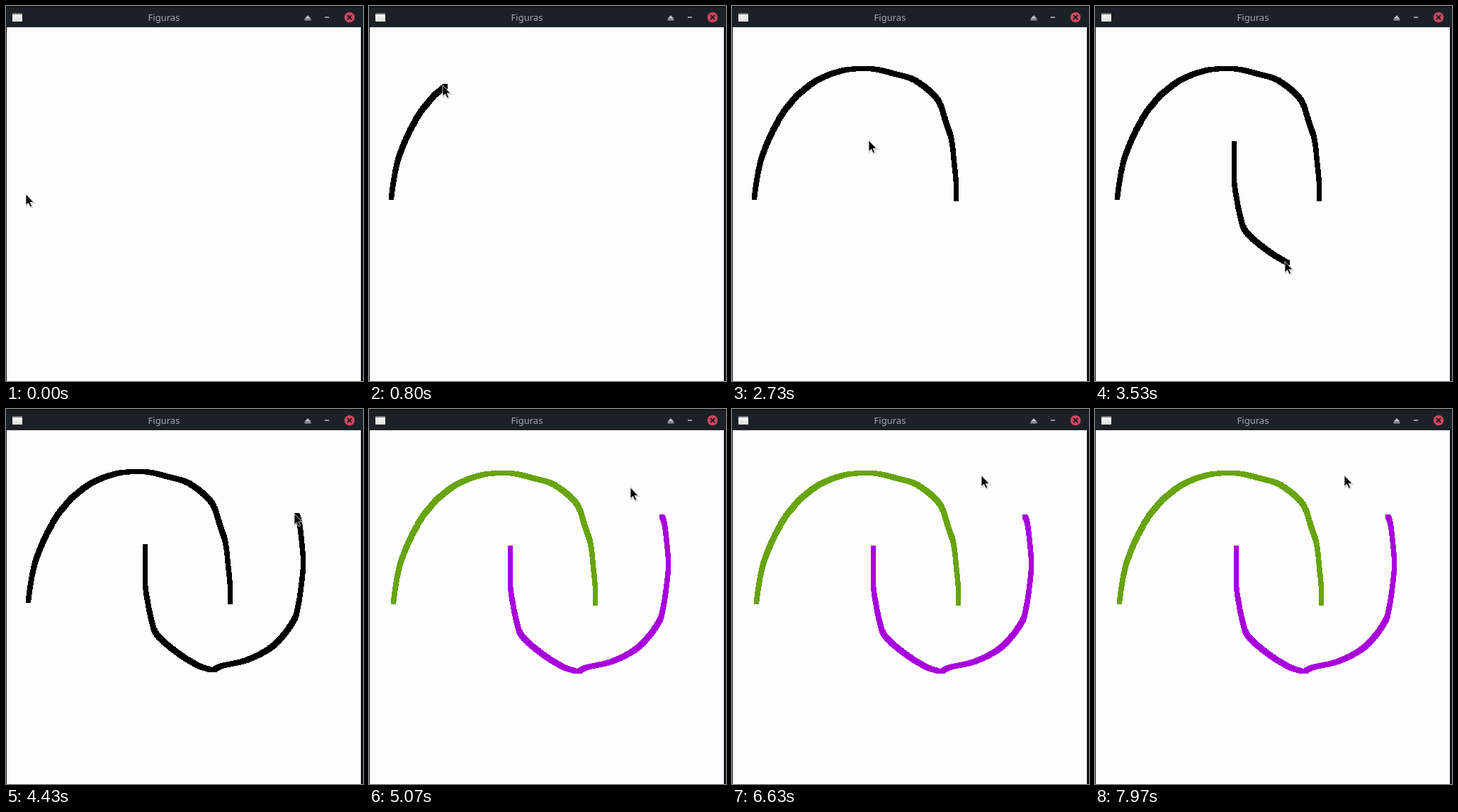
Animation of 504 by 530 pixels, one loop 8 s. Source, as an HTML page with a canvas:

```html
<!DOCTYPE html>
<html lang="es">
<head>
<meta charset="utf-8">
<title>Figuras</title>
<style>
  html, body { margin: 0; width: 100%; height: 100%; overflow: hidden; background: #fdfdfd; }
  canvas, svg { position: absolute; left: 0; top: 0; display: block; }
  text { font: 13px "Noto Sans", "Open Sans", sans-serif; fill: #a4a8ae; text-anchor: middle; }
</style>
</head>
<body>
<canvas id="board" width="504" height="530"></canvas>
<svg width="504" height="530" viewBox="0 0 504 530">
  <defs>
    <linearGradient id="icon" x2="0" y2="1">
      <stop offset="0" stop-color="#ffffff"/>
      <stop offset="1" stop-color="#dcdcd8"/>
    </linearGradient>
    <path id="arrow" d="M0 0V15.5L3.6 12.3 6.2 18 8.6 17 6.1 11.4H11Z"/>
  </defs>

  <rect width="504" height="30" fill="#1c2127"/>
  <path d="M0 0H504V2H0ZM0 30H1V530H0ZM501 30H504V530H501Z" fill="#0f1317"/>
  <rect x="9" y="10" width="14" height="12" fill="url(#icon)"/>
  <rect x="9" y="10" width="14" height="2" fill="#777b80"/>
  <text x="223" y="21">Figuras</text>
  <path d="M421.5 18L426 13 430.5 18ZM421.5 18.7H430.5V20.3H421.5ZM450 15.2H456V16.8H450Z" fill="#bcc0c6"/>
  <circle cx="485" cy="16" r="7.3" fill="#c9485f"/>
  <path d="M482 13L488 19M488 13L482 19" stroke="#231a22" stroke-width="1.8"/>

  <g id="cursor">
    <use href="#arrow" x="1" y="1" fill="none" stroke="#000" stroke-opacity=".15" stroke-width="2"/>
    <use href="#arrow" fill="#050505" stroke="#f4f4f4" stroke-width=".8"/>
  </g>
</svg>
<script>
const LOOP = 8000, RECOLOR = 4700, BRUSH = 7;
const cursor = document.getElementById("cursor");
const ctx = document.getElementById("board").getContext("2d");

// Catmull-Rom curve through the pointer positions.
function curve(points) {
  const at = i => points[Math.max(0, Math.min(points.length - 1, i))];
  let d = `M${points[0]}`;
  for (let i = 0; i < points.length - 1; i++) {
    const [a, b, c, e] = [at(i - 1), at(i), at(i + 1), at(i + 2)];
    const c1 = b.map((v, n) => v + (c[n] - a[n]) / 6);
    const c2 = c.map((v, n) => v - (e[n] - b[n]) / 6);
    d += `C${c1} ${c2} ${c}`;
  }
  const path = document.createElementNS("http://www.w3.org/2000/svg", "path");
  path.setAttribute("d", d);
  return path;
}

// Brush centres one pixel apart.
function makeStroke(color, keys, points) {
  const path = curve(points), total = path.getTotalLength();
  const dots = Array.from({ length: Math.floor(total) + 1 }, (_, i) => path.getPointAtLength(i));
  return { color, keys, dots };
}

// Keys give the drawn share of each stroke, as [ms, share].
const strokes = [
  makeStroke("#67a40f", [[350, 0], [1530, .895], [1740, 1]], [
    [31.5, 270.5], [36, 240], [42, 214], [54, 184], [70, 154], [83, 137], [96, 123],
    [122, 104], [155, 91.5], [184, 88.5], [206, 90], [230, 96], [252, 102], [266, 110],
    [281, 122], [293, 137], [302, 164], [310, 190], [314, 225], [316, 245], [316.5, 272.5]
  ]),
  makeStroke("#a800dc", [[2930, 0], [3530, .39], [4330, 1]], [
    [196.5, 194.5], [196.5, 245], [200, 272], [206, 301], [214, 320], [240, 343], [268, 361],
    [284, 367], [293, 368.5], [305, 363], [342, 354], [378, 334], [405, 301], [413, 275],
    [418, 240], [419.5, 214], [417, 183], [414, 160], [410.5, 150]
  ])
];

// Pointer travel between strokes, as [ms, x, y].
const travel = [
  [0, 28, 266], [350, 28, 267], [1740, 313.5, 271], [1950, 313.5, 271],
  [2600, 193, 190], [2930, 193, 190], [4330, 407, 148], [4550, 407, 148],
  [5400, 350.5, 92], [5900, 350.5, 92], [6500, 352, 94]
];

const ease = p => p * p * (3 - 2 * p);

function sample(keys, t, shape = p => p) {
  const i = keys.findIndex(k => k[0] > t);
  if (i === 0) return keys[0].slice(1);
  if (i < 0) return keys[keys.length - 1].slice(1);
  const a = keys[i - 1], b = keys[i];
  const p = shape((t - a[0]) / (b[0] - a[0]));
  return a.slice(1).map((v, n) => v + (b[n + 1] - v) * p);
}

function render(t) {
  let [x, y] = sample(travel, t, ease);
  const colored = t >= RECOLOR;
  const [dx, dy] = colored ? [3, 2] : [0, 0];
  ctx.clearRect(0, 0, 504, 530);
  for (const { color, keys, dots } of strokes) {
    if (t < keys[0][0]) continue;
    const [share] = sample(keys, t);
    const last = Math.round(share * (dots.length - 1));
    ctx.fillStyle = colored ? color : "#000";
    for (const dot of dots.slice(0, last + 1)) {
      ctx.fillRect(Math.round(dot.x - BRUSH / 2) + dx, Math.round(dot.y - BRUSH / 2) + dy, BRUSH, BRUSH);
    }
    if (share < 1) {
      x = dots[last].x - 3;
      y = dots[last].y - 2;
    }
  }
  cursor.setAttribute("transform", `translate(${Math.round(x)} ${Math.round(y)})`);
}

const start = performance.now();
function tick(now) {
  render(Math.max(0, now - start) % LOOP);
  requestAnimationFrame(tick);
}
render(0);
requestAnimationFrame(tick);
</script>
</body>
</html>
```
